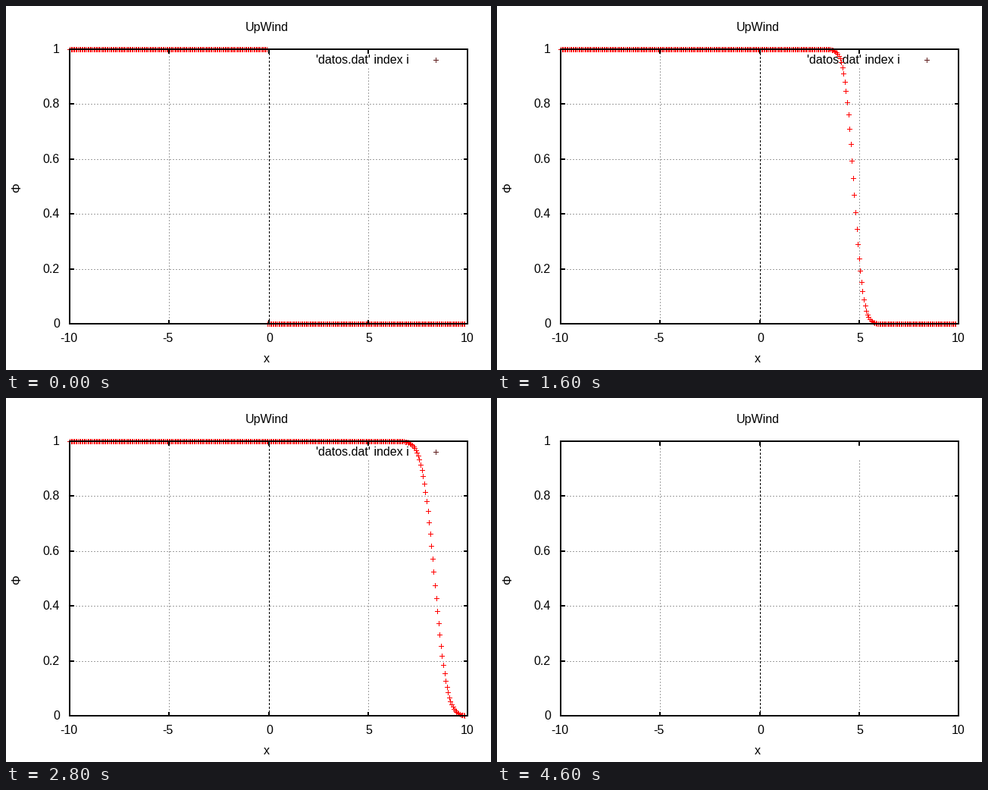
These frames come from a looping animation (640x480 px, 5100 ms). A matplotlib script:

```python
import matplotlib.pyplot as plt
import numpy as np
from matplotlib.animation import FuncAnimation
from matplotlib.collections import PolyCollection

plt.rcParams["font.family"] = "Liberation Sans"

W, H = 640, 480
LEFT, RIGHT, TOP, BOTTOM = 84, 609, 57, 419
X_TICKS = (215, 347, 478)
Y_TICKS = (129, 202, 274, 347)
RED, GREY = "#ff0000", "#a0a0a0"

# Advection of a step with the upwind scheme
DX, CELLS, STEP_CELL = 0.06, 332, 165
COURANT, STEPS_PER_FRAME = 0.5, 10
FRAMES, BLANK_FROM = 51, 46

fig = plt.figure(figsize=(W / 100, H / 100), dpi=100, facecolor="white")
ax = fig.add_axes([0, 0, 1, 1])
ax.set_xlim(0, W)
ax.set_ylim(H, 0)
ax.axis("off")


def polys(verts, color, z):
    coll = PolyCollection(verts, facecolors=color, edgecolors="none",
                          linewidths=0, antialiaseds=False, zorder=z)
    ax.add_collection(coll, autolim=False)
    return coll


def box(x, y, w, h):
    return [(x, y), (x + w, y), (x + w, y + h), (x, y + h)]


def label(x, y, text, **kw):
    return ax.text(x, y, text, fontsize=11.52, color="black",
                   va="baseline", zorder=2, **kw)


def dots_h(y, on=2, gap=2):
    return [box(x, y, on, 1) for x in range(LEFT, RIGHT, on + gap)]


def dots_v(x, top=TOP, on=2, gap=2):
    return [box(x, y - on + 1, 1, on) for y in range(BOTTOM, top, -on - gap)]


# Plus sign of 7 x 7 pixels around the pixel at (0, 0)
PLUS = np.array([(0, -3), (1, -3), (1, 0), (4, 0), (4, 1), (1, 1),
                 (1, 4), (0, 4), (0, 1), (-3, 1), (-3, 0), (0, 0)])


def plus_signs(x, y):
    return np.stack([x, y], axis=-1)[:, None, :] + PLUS


# Grid, interrupted behind the key
grid = [d for y in Y_TICKS for d in dots_h(y)]
grid += dots_v(X_TICKS[0]) + dots_v(X_TICKS[2], 82)
polys(grid, GREY, 1)
polys(dots_v(X_TICKS[1], on=3, gap=2), "black", 1.1)

# Frame and ticks lie over the data
w, h = RIGHT - LEFT + 2, BOTTOM - TOP + 2
frame = [box(LEFT - 1, y - 1, w, 2) for y in (TOP, BOTTOM)]
frame += [box(x - 1, TOP - 1, 2, h) for x in (LEFT, RIGHT)]
for tx in X_TICKS:
    frame += [box(tx - 1, TOP, 2, 6), box(tx - 1, BOTTOM - 5, 2, 6)]
for ty in Y_TICKS:
    frame += [box(LEFT, ty - 1, 6, 2), box(RIGHT - 5, ty - 1, 6, 2)]
polys(frame, "black", 4)

label(316, 33, "UpWind")
label(340, 470, "x")
label(19, 240, "\u03a6", rotation=90, rotation_mode="anchor", ha="center")
for x, text in ((71, "-10"), (206, "-5"), (343, "0"), (474, "5"), (600, "10")):
    label(x, 443, text)
for y, text in zip((TOP,) + Y_TICKS + (BOTTOM,),
                   ("1", "0.8", "0.6", "0.4", "0.2", "0")):
    label(48 if "." in text else 62, y + 5, text)

key = [label(409, 76, "'datos.dat' index i"),
       polys(plus_signs(np.array([567]), np.array([71])), "#602020", 2)]

cells = np.arange(CELLS)
px = np.floor(LEFT + cells * DX * (RIGHT - LEFT) / 20 + 0.5)
data = polys(plus_signs(px, np.full(CELLS, BOTTOM)), RED, 3)


def solve():
    u = (cells <= STEP_CELL).astype(float)
    states = [u.copy()]
    for _ in range(BLANK_FROM - 1):
        for _ in range(STEPS_PER_FRAME):
            u[1:] -= COURANT * (u[1:] - u[:-1])
        states.append(u.copy())
    return states


states = solve()


def draw(i):
    shown = i < BLANK_FROM
    for artist in key + [data]:
        artist.set_visible(shown)
    if shown:
        py = BOTTOM - np.floor(states[i] * (BOTTOM - TOP) + 0.5)
        data.set_verts(plus_signs(px, py))
    return key + [data]


anim = FuncAnimation(fig, draw, frames=FRAMES, interval=100, repeat=True)
plt.show()
```
